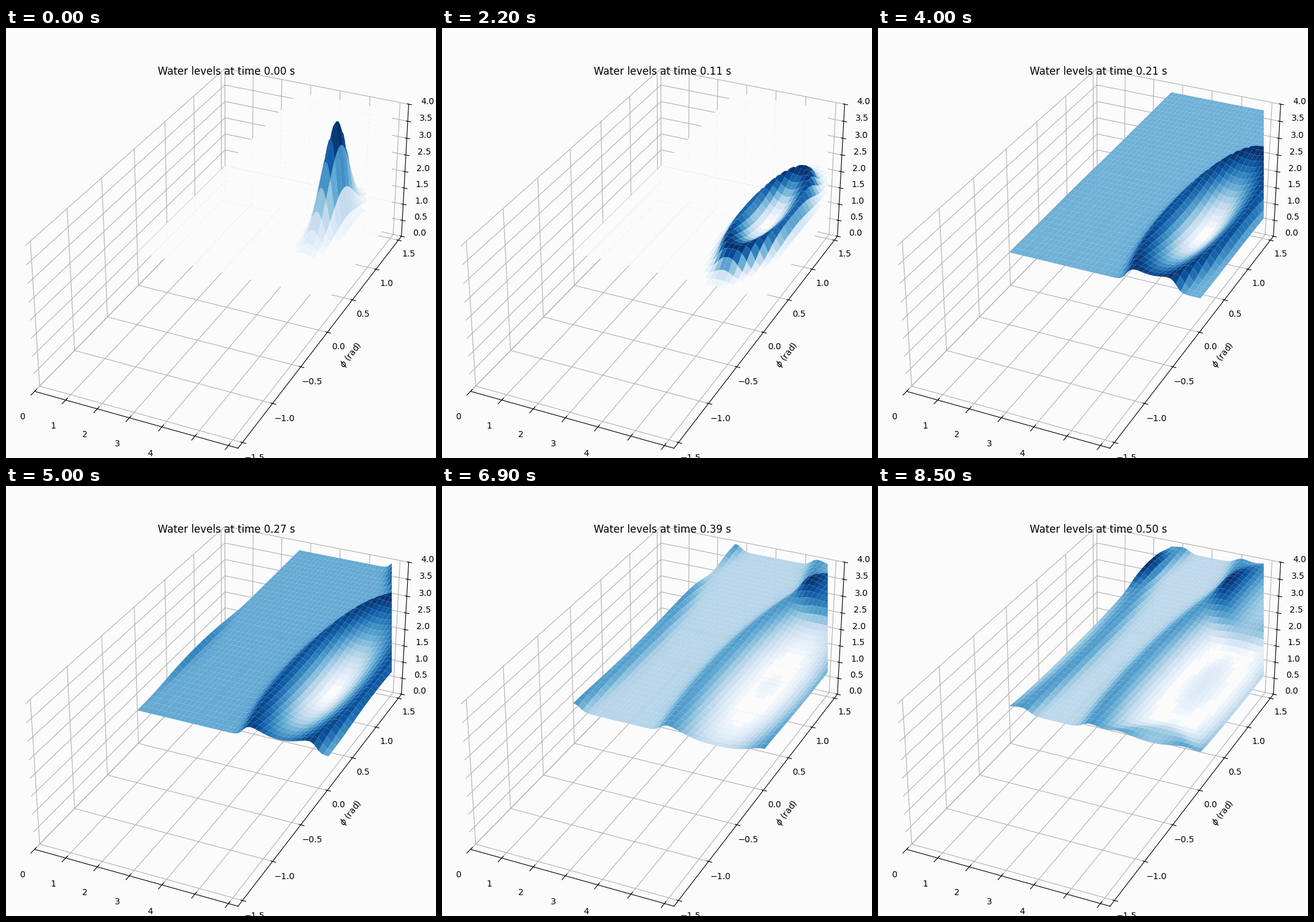
Recreate the animation shown at these times as a matplotlib script. Size 700x700 px, loop 8.6 s.

```python
import numpy as np
import matplotlib.pyplot as plt
from matplotlib.animation import FuncAnimation
from matplotlib.colors import ListedColormap
from mpl_toolkits.mplot3d.art3d import Poly3DCollection

BG = "#fbfbfb"
PAPER = (251 / 255, 251 / 255, 251 / 255, 1)
FRAMES = 86
N, STRIDE = 120, 3
G = 9.81
LX, LY = 2 * np.pi, np.pi
SPACING = (LX / N, LY / N)

# Simulated time per frame; steps grow as the waves slow down
times = np.interp(np.arange(FRAMES),
                  [0, 15, 30, 50, 62, 77, 85],
                  [0, 0.07, 0.15, 0.27, 0.347, 0.448, 0.5])


def divergence(state, axis):
    """Rusanov flux difference along one periodic axis."""
    h = state[0]
    vel = state[1 + axis] / h
    flux = state * vel
    flux[1 + axis] += 0.5 * G * h ** 2
    speed = np.abs(vel) + np.sqrt(G * h)
    speed = np.maximum(speed, np.roll(speed, -1, axis))
    ahead = np.roll(state, -1, axis + 1)
    face = 0.5 * (flux + np.roll(flux, -1, axis + 1) - speed * (ahead - state))
    return (face - np.roll(face, 1, axis + 1)) / SPACING[axis]


def simulate():
    """Water height for every frame of the shallow water run."""
    x = np.arange(N) * SPACING[0]
    y = np.arange(N) * SPACING[1]
    r2 = (x[:, None] - 1.5 * np.pi) ** 2 + (y[None, :] - np.pi / 3) ** 2
    state = np.zeros((3, N, N))
    state[0] = 1 + 3 * np.exp(-10 * r2)
    heights = [state[0].copy()]
    for span in np.diff(times):
        steps = int(np.ceil(span / 0.0018))
        dt = span / steps
        for _ in range(steps):
            state = state - dt * (divergence(state, 0) + divergence(state, 1))
        heights.append(state[0].copy())
    return [np.pad(h, (0, 1), mode="wrap") for h in heights]


heights = simulate()

# Outline of each surface patch, following the fine grid
s = STRIDE
oi = np.array([*range(s), *[s] * s, *range(s, 0, -1), *[0] * s])
oj = np.array([*[0] * s, *range(s), *[s] * s, *range(s, 0, -1)])
ci, cj = np.meshgrid(np.arange(0, N, s), np.arange(0, N, s), indexing="ij")
I = ci.ravel()[:, None] + oi
J = cj.ravel()[:, None] + oj
px, py = I * SPACING[0], J * SPACING[1]


def patches(h):
    return np.stack([px, py, h[I, J]], axis=-1)


shades = plt.get_cmap("Blues")(np.linspace(0, 1, 256))
shades[:8] = PAPER

fig = plt.figure(figsize=(7, 7), dpi=100, facecolor=BG)
ax = fig.add_subplot(projection="3d", facecolor=BG)
ax.set_xlim(0, LX)
ax.set_ylim(-np.pi / 2, np.pi / 2)
ax.set_zlim(0, 4)
ax.set_box_aspect((4, 8, 3), zoom=np.sqrt(89 / 41))
ax.view_init(elev=30, azim=-65)
ax.set_ylabel(r"$\phi$ (rad)")
for axis in (ax.xaxis, ax.yaxis, ax.zaxis):
    axis.set_pane_color(PAPER)

water = Poly3DCollection(list(patches(heights[0])), cmap=ListedColormap(shades),
                         edgecolors="none", linewidths=0)
water.set_array(heights[0][I, J].mean(axis=1))
ax.add_collection3d(water)
title = ax.set_title("")


def update(n):
    level = heights[n][I, J].mean(axis=1)
    water.set_verts(list(patches(heights[n])))
    water.set_array(level)
    water.set_clim(level.min(), level.max())
    title.set_text(f"Water levels at time {times[n]:.2f} s")
    return water, title


def init():
    return update(0)


anim = FuncAnimation(fig, update, frames=FRAMES, init_func=init,
                     interval=100, repeat=True, repeat_delay=0, blit=False)
plt.show()
```
